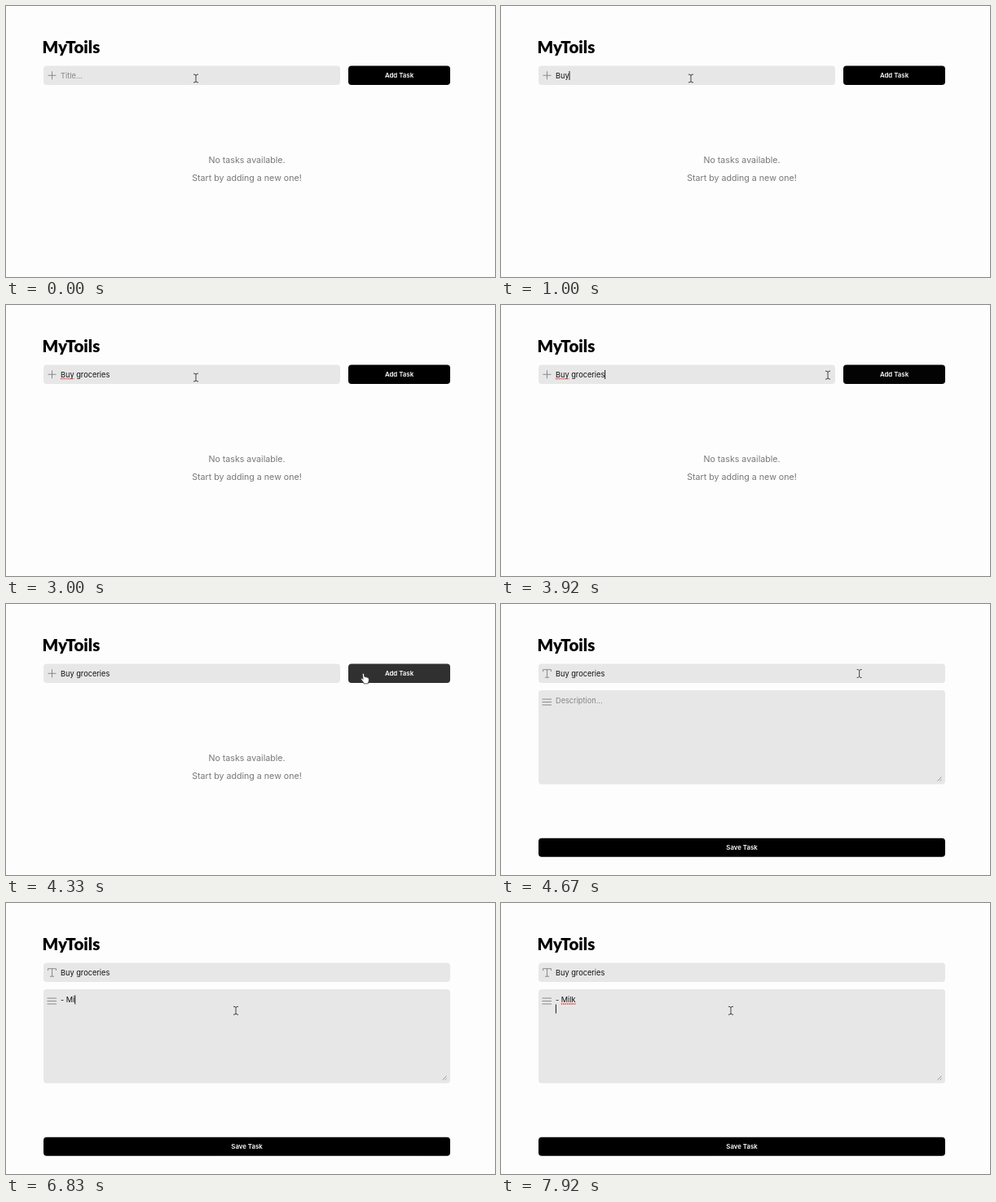
Recreate the animation shown at these times as an HTML page. Size 600x333 px, loop 8 s.

```html
<!DOCTYPE html>
<html lang="en">
<head>
<meta charset="utf-8">
<title>Task list</title>
<style>
  html, body { margin: 0; width: 100%; height: 100%; overflow: hidden; background: #fefdfe; }
  svg { display: block; width: 600px; height: 333px; }
  text { font: 9.2px Inter, sans-serif; fill: #111; }
  .heading { font: 900 20.5px Lato, sans-serif; fill: #000; }
  .note { font-size: 10.65px; fill: #777; text-anchor: middle; }
  .label { font-size: 7.85px; font-weight: 600; fill: #fff; text-anchor: middle; }
  .hint { fill: #858585; }
  .field { fill: #e8e7e8; }
  .icon { fill: none; stroke: #8a8a8a; }
  .spell { stroke: #e5352f; stroke-width: 1.3; stroke-dasharray: 1.4 .9; }
  .halo { fill: none; stroke: #fff; stroke-opacity: .7; stroke-width: 2; }
  .beam { fill: none; stroke: #333; }
</style>
</head>
<body>
<svg viewBox="0 0 600 333">
  <text class="heading" x="44.5" y="58.4">MyToils</text>

  <g id="listPage">
    <rect class="field" x="46" y="73.5" width="364" height="23.5" rx="4"/>
    <path class="icon" d="M51.5 85.3h10M56.5 80.3v10"/>
    <rect id="addButton" x="420" y="73.5" width="125" height="23.5" rx="4"/>
    <text class="label" x="482.5" y="88.3">Add Task</text>
    <text class="note" x="295.5" y="192.6">No tasks available.</text>
    <text class="note" x="295.5" y="215">Start by adding a new one!</text>
  </g>

  <g id="formPage">
    <rect class="field" x="46" y="73.5" width="499" height="23.5" rx="4"/>
    <path class="icon" d="M51.5 83v-2.3h10v2.3M56.5 80.7v9.4M54 90.2h5"/>
    <rect class="field" x="46" y="106" width="499" height="115.5" rx="4"/>
    <path class="icon" d="M50.5 117h11.5M50.5 120.5h11.5M50.5 124h11.5"/>
    <path class="icon" stroke-width=".8" d="M535.5 217.5l5-5M538.5 217.5l2-2"/>
    <rect x="46" y="287.7" width="499" height="23" rx="4"/>
    <text class="label" x="295.5" y="302.4">Save Task</text>
  </g>

  <text id="titleHint" class="hint" x="67" y="88.6">Title...</text>
  <text id="title" x="67" y="88.6" xml:space="preserve"></text>
  <text id="bodyHint" class="hint" x="67" y="122">Description...</text>
  <text id="body" x="67" y="122" xml:space="preserve"></text>
  <path id="spell" class="spell"/>
  <path id="caret" stroke="#000" stroke-width=".9"/>

  <g id="pointer">
    <g id="beam">
      <path class="halo" d="M-3-5q2.5 0 3 1.2q.5-1.2 3-1.2M0-4v8M-3 5q2.5 0 3-1.2q.5 1.2 3 1.2"/>
      <path class="beam" d="M-3-5q2.5 0 3 1.2q.5-1.2 3-1.2M0-4v8M-3 5q2.5 0 3-1.2q.5 1.2 3 1.2"/>
    </g>
    <path id="arrow" stroke="#fff" stroke-width=".8" d="M0 0v10l2.3-2.1 1.5 3.4 1.7-.7-1.5-3.4h3.2z"/>
    <path id="hand" fill="#fff" stroke="#222" stroke-width=".7" stroke-linejoin="round"
      d="M-2.4 1q0-1.2 1-1.2t1.1 1.2l.5 3q1.4-.6 1.9.5q1.4-.5 1.8.6q1.6-.2 1.7 1.5v2q0 1.4-.9 2.4v1.4h-5.4v-1l-3.2-4.1q-.7-1.2.3-1.5t2 1.2z"/>
  </g>
</svg>
<script>
const $ = id => document.getElementById(id);
const LOOP = 8000, SUBMIT = 4660, BLUR = 4245, FOCUS = 5490;
const start = performance.now();

const title = {
  node: $('title'), hint: $('titleHint'), text: 'Buy groceries', baseline: 88.6,
  keys: [325, 660, 995, 1075, 1325, 1490, 1660, 1990, 2160, 2245, 2410, 2450, 2495]
};
const body = {
  node: $('body'), hint: $('bodyHint'), text: '- Milk\n', baseline: 122,
  keys: [5995, 6160, 6410, 6660, 6995, 7325, 7450]
};

const clamp = v => Math.max(0, Math.min(1, v));
const show = (node, on) => node.style.display = on ? '' : 'none';
const ease = (t, from, to) => {
  const p = clamp((t - from) / (to - from));
  return p * p * (3 - 2 * p);
};

function type(entry, t) {
  const count = entry.keys.filter(k => k <= t).length;
  entry.typed = entry.text.slice(0, count);
  entry.lastKey = entry.keys[count - 1];
  entry.node.textContent = entry.typed.trimEnd() === entry.typed.replace('\n', '')
    ? entry.typed.replace('\n', '') : entry.typed;
}

function drawCaret(entry, t, since) {
  const newLine = entry.typed.endsWith('\n');
  const x = 67.4 + (newLine || !entry.typed ? 0 : entry.node.getComputedTextLength());
  const y = entry.baseline - 8.6 + (newLine ? 11.2 : 0);
  $('caret').setAttribute('d', `M${x} ${y}v11`);
  show($('caret'), (t - since) % 1000 < 500);
}

function drawSpell(entry, first, length) {
  const x = 67 + (first ? entry.node.getSubStringLength(0, first) : 0);
  const width = entry.node.getSubStringLength(first, length);
  $('spell').setAttribute('d', `M${x} ${entry.baseline + 2}h${width}`);
}

function drawPointer(t, form) {
  const right = ease(t, 3400, 4120), back = ease(t, 4985, 5500);
  const x = 233 + 206.7 * right - 157.7 * back;
  const y = 89 - 3.5 * right + 46.7 * back;
  const overButton = !form && x > 420;
  const overField = form ? y < 97 || y > 106 : x < 410;
  show($('hand'), overButton);
  show($('beam'), overField);
  show($('arrow'), !overButton && !overField);
  $('pointer').setAttribute('transform', `translate(${x} ${y})`);
}

function draw(now) {
  const t = (now - start + LOOP) % LOOP, form = t >= SUBMIT;
  show($('listPage'), !form);
  show($('formPage'), form);
  type(title, t);
  type(body, t);
  show(title.hint, !title.typed);
  show(body.hint, form && !body.typed);

  const shade = Math.round(48 * clamp((t - 3900) / 300));
  $('addButton').setAttribute('fill', `rgb(${shade},${shade},${shade})`);

  const titleMarked = t >= 1325 && t < BLUR, bodyMarked = t >= 7660;
  show($('spell'), titleMarked || bodyMarked);
  if (titleMarked) drawSpell(title, 0, 3);
  if (bodyMarked) drawSpell(body, 2, 4);

  if (t >= FOCUS) drawCaret(body, t, body.lastKey || FOCUS);
  else if (title.typed && t < BLUR) drawCaret(title, t, title.lastKey);
  else show($('caret'), false);

  drawPointer(t, form);
  requestAnimationFrame(draw);
}
draw(start);
</script>
</body>
</html>
```
